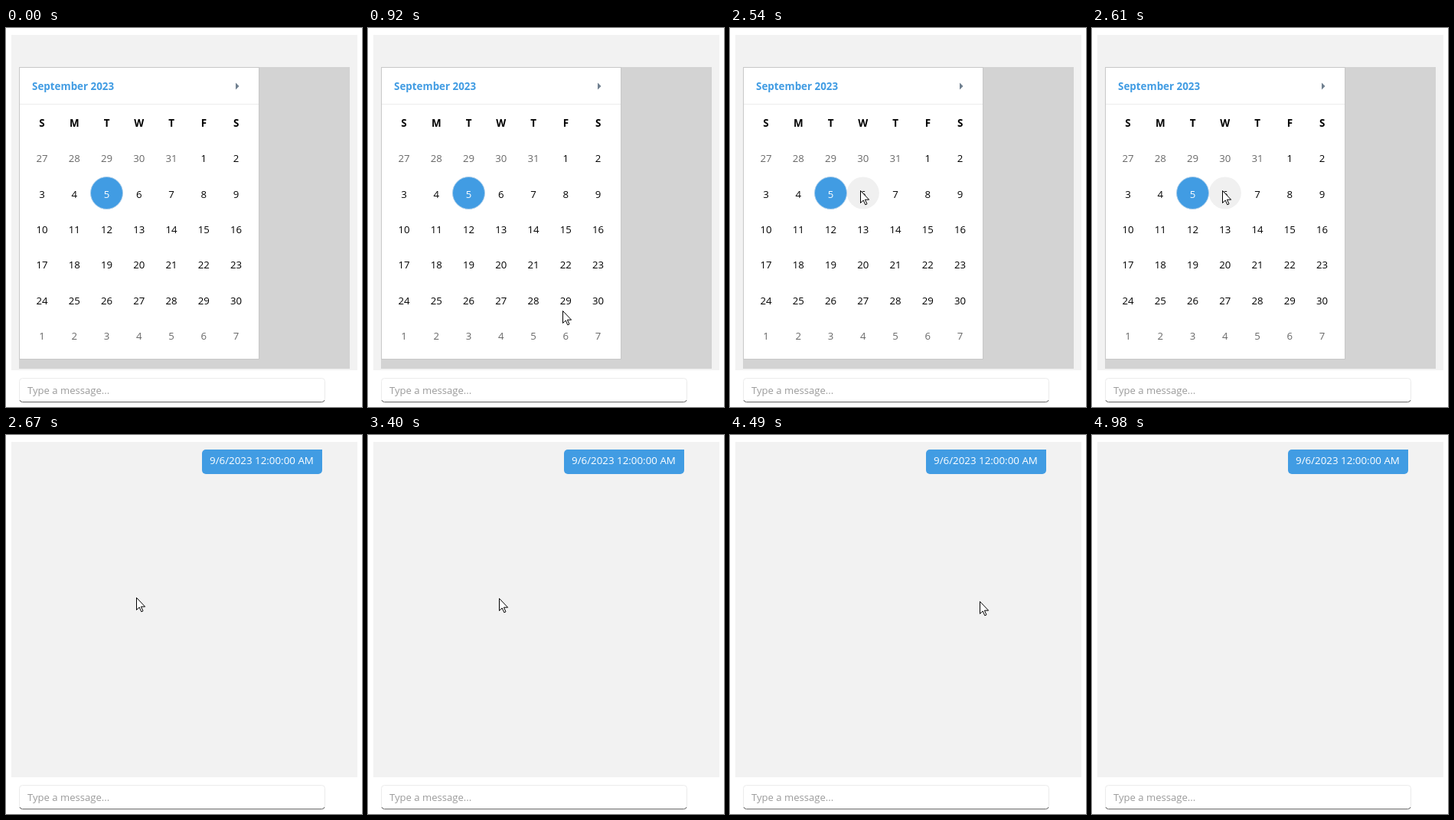
Animation of 465x495 px, one loop 6540 ms. Source, as an HTML page:

```html
<!DOCTYPE html>
<html lang="en">
<head>
<meta charset="utf-8">
<title>Chat date picker</title>
<style>
  html, body { margin: 0; width: 100%; height: 100%; overflow: hidden; background: #fff; }
  svg { display: block; width: 465px; height: 495px; }
  text { font: 13.2px "Open Sans", "Noto Sans", sans-serif; }
  .bold { font-weight: 700; font-size: 13.4px; }
  .mid { text-anchor: middle; }
</style>
</head>
<body>
<svg viewBox="0 0 465 495">
  <rect x="7" y="9" width="452" height="438" fill="#f2f2f2"/>

  <g id="picker">
    <rect x="17" y="51" width="432" height="394" fill="#d3d3d3"/>
    <rect x="17.5" y="51.5" width="313" height="381" fill="#fff" stroke="#c8c8c8"/>
    <path d="M18 99.5H330" stroke="#ececec"/>
    <text class="bold" x="34" y="81" fill="#419ce3">September 2023</text>
    <path d="M300 71.5l4.5 4.5-4.5 4.5z" fill="#708090"/>
    <circle id="hover" r="21" fill="#f0f0f0"/>
    <circle cx="131.5" cy="215.5" r="21" fill="#419ce3" stroke="#a9cdea"/>
    <g id="days" class="mid"></g>
  </g>

  <g id="bubble">
    <path d="M261 19H413V46a5 5 0 0 1-5 5H261a5 5 0 0 1-5-5V24a5 5 0 0 1 5-5z" fill="#419ce3"/>
    <text x="266" y="38" fill="#fff" style="font-size:13.35px">9/6/2023 12:00:00 AM</text>
  </g>

  <rect x="17.5" y="457.5" width="399" height="31" rx="4" fill="#fff" stroke="#ebebeb"/>
  <path d="M18 486q.5 2.5 3.5 2.5h391q3 0 3.5-2.5" fill="none" stroke="#666"/>
  <text x="28" y="478" fill="#9b9b9b" style="font-size:13.1px">Type a message...</text>

  <path id="cursor" d="M.5.5v16l3.7-3.5 2.6 5.8 2.2-1-2.6-5.6h5.2z"
        fill="#fff" stroke="#000" stroke-linejoin="round"/>
</svg>
<script>
const LOOP = 6540, SENT = 2670, LAG = 68;
const $ = id => document.getElementById(id);
const colX = c => 47 + 42.27 * c;
const rowY = r => Math.round(170.4 + 46.35 * r);

function label(x, y, value, fill, cls = '') {
  const t = document.createElementNS('http://www.w3.org/2000/svg', 'text');
  t.setAttribute('x', x);
  t.setAttribute('y', y);
  t.setAttribute('fill', fill);
  t.setAttribute('class', cls);
  t.textContent = value;
  $('days').append(t);
}

[...'SMTWTFS'].forEach((d, c) => label(colX(c), 129, d, '#000', 'bold'));
for (let i = 0; i < 42; i++) {
  const date = new Date(2023, 8, i - 4);
  const day = date.getDate(), inMonth = date.getMonth() === 8;
  const fill = !inMonth ? '#686868' : day === 5 ? '#fff' : '#000';
  label(colX(i % 7), rowY(Math.floor(i / 7)) + 5, day, fill);
}

// pointer moves: curves from a to c bent towards b, sampled in n jumps
const moves = [
  { from: 920, to: 1260, n: 5, a: [254, 369], b: [235, 225], c: [170, 212] },
  { from: 3330, to: 3470, n: 2, a: [170, 212], b: [171, 213], c: [172, 214] },
  { from: 4000, to: 4630, n: 9, a: [174, 214], b: [272, 128], c: [370, 268] },
  { from: 4630, to: 4980, n: 5, a: [370, 268], b: [400, 340], c: [435, 520] }
];

function pointer(t) {
  const m = moves.findLast(m => m.from <= t);
  if (!m) return null;
  const k = Math.min(1, Math.floor((t - m.from) / (m.to - m.from) * m.n + 1e-6) / m.n);
  return m.a.map((a, i) =>
    Math.round((1 - k) ** 2 * a + 2 * k * (1 - k) * m.b[i] + k * k * m.c[i]));
}

const show = (id, on) => $(id).style.display = on ? '' : 'none';
const place = (id, x, y) => $(id).setAttribute('transform', `translate(${x} ${y})`);

function draw(t) {
  const tip = pointer(t), over = pointer(t - LAG);
  show('picker', t < SENT);
  show('bubble', t >= SENT);
  show('cursor', tip);
  show('hover', over);
  if (tip) place('cursor', ...tip);
  if (over) {
    const col = Math.round((over[0] - 47) / 42.27);
    const row = Math.round((over[1] - 160) / 46.35);
    place('hover', colX(col), rowY(row) - 1.5);
  }
}

const start = performance.now();
function tick() {
  draw((performance.now() - start) % LOOP);
  requestAnimationFrame(tick);
}
tick();
</script>
</body>
</html>
```
